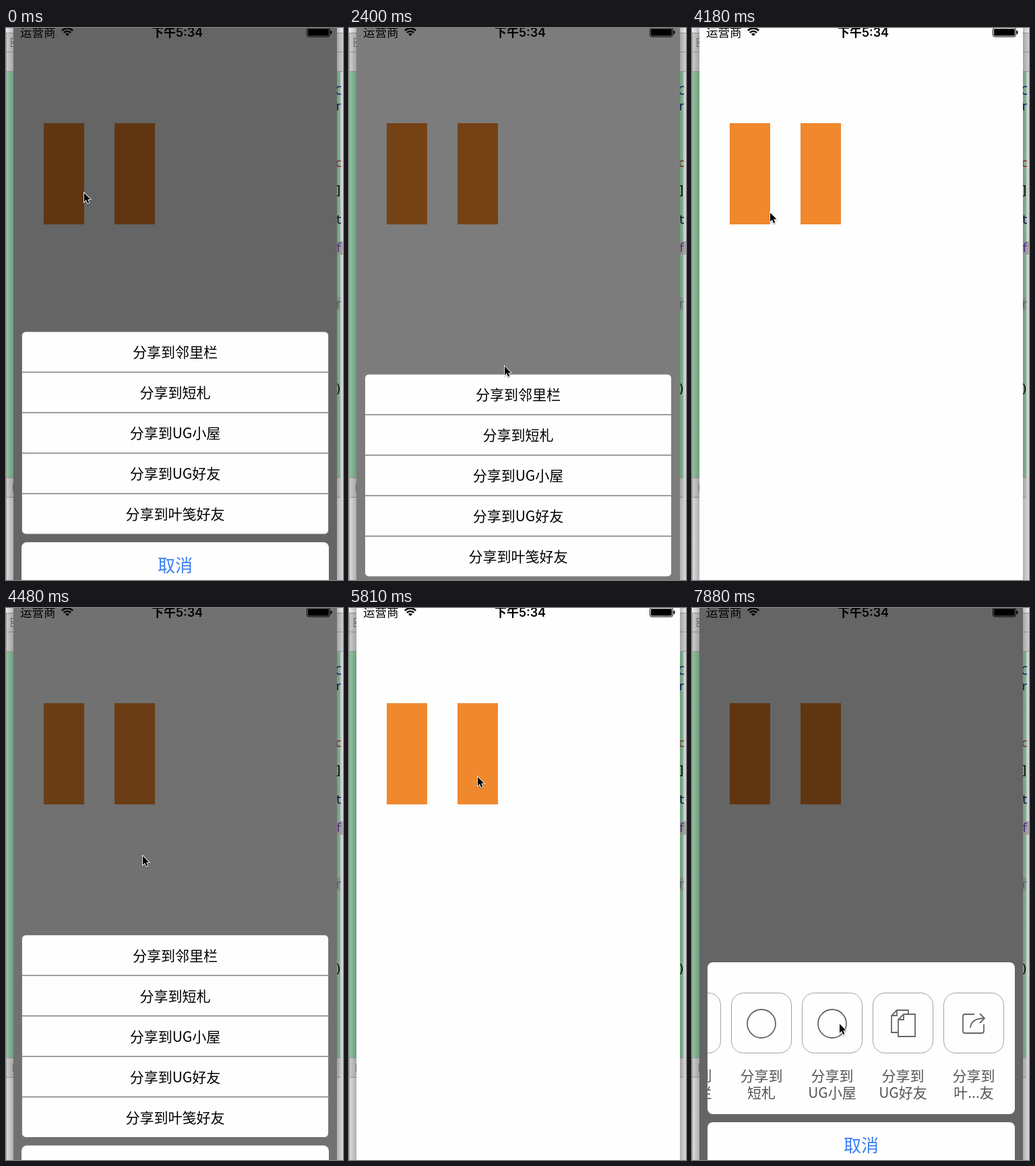
An HTML page with a canvas that plays this animation: 500 px wide and 818 px high, repeating every 8 s.

```html
<!DOCTYPE html>
<html lang="zh">
<head>
<meta charset="utf-8">
<title>分享面板</title>
<style>
html, body { margin: 0; width: 100%; height: 100%; overflow: hidden; background: #fefefe; }
canvas { display: block; width: 500px; height: 818px; }
</style>
</head>
<body>
<canvas id="stage" width="500" height="818"></canvas>
<script>
const ctx = document.getElementById('stage').getContext('2d');
const LOOP = 8000;
const CJK = '"Noto Sans CJK SC", "Noto Sans CJK", sans-serif';
const MONO = '"DejaVu Sans Mono", monospace';
const GREY = '#666';
const ORANGE = '#f0882e';

// Screen refreshes: first tick, last tick, number of ticks
const REFRESH = [
  [150, 600, 4], [1500, 1950, 4], [2250, 2990, 6], [3290, 4330, 8],
  [4480, 4780, 3], [5080, 5810, 6], [6250, 7280, 8], [7430, 7880, 4]
];
const POINTER = [
  [0, 115, 243], [600, 256, 541], [1350, 256, 541], [1500, 245, 485],
  [1950, 104, 238], [2250, 104, 238], [2400, 230, 500], [2990, 285, 663],
  [3290, 285, 663], [4190, 100, 238], [4330, 104, 242], [4480, 202, 366],
  [4780, 245, 600], [5080, 245, 590], [5810, 190, 249], [6250, 190, 249],
  [6850, 340, 615], [6990, 340, 615], [7280, 218, 615]
];
const SCROLL = [[6900, 0], [7280, 125], [7880, 85]];
const SHEETS = [
  { rise: -1000, fall: 1384.6, travel: 425, paint: drawList },
  { rise: 2208.8, fall: 3230, travel: 425, paint: drawList },
  { rise: 4273.8, fall: 5000, travel: 425, paint: drawList },
  { rise: 6190, fall: 9000, travel: 350, paint: drawGrid }
];
const TARGETS = ['邻里栏', '短札', 'UG小屋', 'UG好友', '叶笺好友'];

const clamp = u => Math.max(0, Math.min(1, u));
const ease = u => { u = clamp(u); return u * u * (3 - 2 * u); };
const halfPixel = v => Math.round(v * 2) / 2;

function refreshTime(t) {
  let last = 0;
  for (const [start, end, count] of REFRESH) {
    if (t < start) break;
    const gap = (end - start) / (count - 1);
    last = Math.min(end, start + Math.floor((t - start) / gap + 1e-6) * gap);
  }
  return last;
}

function follow(keys, t) {
  const next = keys.findIndex(k => k[0] > t);
  if (next < 0) return keys[keys.length - 1].slice(1);
  if (next === 0) return keys[0].slice(1);
  const a = keys[next - 1], b = keys[next];
  const u = ease((t - a[0]) / (b[0] - a[0]));
  return a.slice(1).map((v, i) => v + (b[i + 1] - v) * u);
}

function rect(color, x, y, w, h) {
  ctx.fillStyle = color;
  ctx.fillRect(x, y, w, h);
}

function rounded(x, y, w, h, r) {
  ctx.beginPath();
  ctx.roundRect(x, y, w, h, r);
}

function text(str, x, y, font, color = '#000', align = 'center') {
  ctx.font = font;
  ctx.fillStyle = color;
  ctx.textAlign = align;
  ctx.fillText(str, x, y);
}

function line(points, close) {
  ctx.beginPath();
  points.forEach(([x, y]) => ctx.lineTo(x, y));
  if (close) ctx.closePath();
}

function drawDesktop() {
  for (const [x, w] of [[0, 11], [491, 9]]) {
    rect('#fafafa', x, 0, w, 7);
    rect('#dcdcdc', x, 7, w, 58);
    rect('#a8a8a8', x, 7, w, 1);
    rect('#a8a8a8', x, 35, w, 1);
    rect('#a8a8a8', x, 64, w, 1);
    rect('#97d3aa', x, 65, w, 601);
    rect('#a8a8a8', x, 666, w, 1);
    rect('#dcdcdc', x, 667, w, 28);
    rect('#a8a8a8', x, 695, w, 1);
    rect('#ececec', x, 696, w, 122);
  }
  rect('#a5a5a5', 0, 7, 1, 811);
  rect('#e6e6e6', 496, 65, 4, 753);
  ctx.strokeStyle = '#777';
  ctx.lineWidth = 1;
  ctx.strokeRect(7.5, 15.5, 6, 5);
  ctx.strokeRect(7.5, 22.5, 6, 5);
  rect('#888', 10, 675, 1, 12);
  rect('#b5b5b5', 491, 316, 9, 20);
  rect('#9db3a6', 491, 399, 5, 20);
  const code = [
    ['C', 99, '#1a1a70'], ['r', 122, '#1a1a70'], ['c', 206, '#b02a30'], [']', 247, '#000'],
    ['t', 290, '#101040'], ['f', 332, '#5a3a9a'], ['r', 415, '#6a7f80'], [')', 541, '#000']
  ];
  ctx.save();
  ctx.beginPath();
  ctx.rect(491, 65, 6, 601);
  ctx.clip();
  for (const [ch, y, color] of code) text(ch, 488, y, '18px ' + MONO, color, 'left');
  ctx.restore();
  shade(11, 0, 11);
  shade(491, 500, 9);
}

function shade(from, to, width) {
  const g = ctx.createLinearGradient(from, 0, to, 0);
  g.addColorStop(0, 'rgba(0,0,0,.26)');
  g.addColorStop(1, 'rgba(0,0,0,.05)');
  rect(g, Math.min(from, to), 0, width, 818);
}

function drawStatusBar() {
  text('运营商', 21, 13, '17.5px ' + CJK, '#000', 'left');
  text('下午5:34', 254, 13, '600 18px Inter, ' + CJK);
  ctx.strokeStyle = ctx.fillStyle = '#000';
  ctx.lineWidth = 2.6;
  for (const r of [11.5, 7.3]) {
    ctx.beginPath();
    ctx.arc(91, 12, r, -Math.PI * .75, -Math.PI * .25);
    ctx.stroke();
  }
  ctx.beginPath();
  ctx.moveTo(91, 12);
  ctx.arc(91, 12, 4.2, -Math.PI * .75, -Math.PI * .25);
  ctx.fill();
  ctx.lineWidth = 1;
  rounded(446.5, -.5, 34, 13.5, 3);
  ctx.stroke();
  rounded(448, 1, 31, 10.5, 1.5);
  ctx.fill();
  rounded(481.5, 4, 2, 5, 1);
  ctx.fill();
}

function drawPanel(x, y, w, h, r) {
  rounded(x, y, w, h, r);
  ctx.fillStyle = '#fefefe';
  ctx.fill();
}

function drawList() {
  drawPanel(23.5, 450, 455, 300, 6);
  ctx.strokeStyle = '#7c7c7c';
  ctx.lineWidth = 1;
  ctx.stroke();
  ctx.lineWidth = 1.5;
  TARGETS.forEach((name, i) => {
    const y = 450 + i * 60;
    if (i) {
      line([[24, y], [478, y]]);
      ctx.stroke();
    }
    text('分享到' + name, 251, y + 38, '21px ' + CJK);
  });
}

function drawPages(x, y) {
  line([[x - 8, y + 14], [x - 17, y + 14], [x - 17, y - 11], [x - 9, y - 19], [x + 8, y - 19], [x + 8, y - 13]]);
  ctx.stroke();
  line([[x - 17, y - 11], [x - 9, y - 11], [x - 9, y - 19]]);
  ctx.stroke();
  line([[x - 7, y - 5], [x + 1, y - 13], [x + 18, y - 13], [x + 18, y + 20], [x - 7, y + 20]], true);
  ctx.stroke();
  line([[x - 7, y - 5], [x + 1, y - 5], [x + 1, y - 13]]);
  ctx.stroke();
}

function drawShare(x, y) {
  ctx.beginPath();
  ctx.moveTo(x + 1, y - 13);
  ctx.arcTo(x - 16, y - 13, x - 16, y + 15, 3);
  ctx.arcTo(x - 16, y + 15, x + 15, y + 15, 3);
  ctx.arcTo(x + 15, y + 15, x + 15, y, 3);
  ctx.lineTo(x + 15, y + 2);
  ctx.stroke();
  ctx.beginPath();
  ctx.moveTo(x - 5, y + 7);
  ctx.quadraticCurveTo(x - 4, y - 7, x + 16, y - 7);
  ctx.stroke();
  line([[x + 9, y - 14], [x + 16, y - 7], [x + 9, y]]);
  ctx.stroke();
}

function drawRing(x, y) {
  ctx.beginPath();
  ctx.arc(x, y + 1, 21, 0, Math.PI * 2);
  ctx.stroke();
}

function drawGrid(t) {
  const [scroll] = follow(SCROLL, t);
  const icons = [drawRing, drawRing, drawRing, drawPages, drawShare];
  drawPanel(23, 525, 456, 225, 8);
  ctx.save();
  ctx.clip();
  TARGETS.forEach((name, i) => {
    const x = 83 + i * 105 - scroll;
    rounded(x - 44.5, 570.5, 89, 89, 18);
    ctx.strokeStyle = '#a0a0a0';
    ctx.lineWidth = 1;
    ctx.stroke();
    ctx.strokeStyle = GREY;
    ctx.lineWidth = 1.8;
    icons[i](x, 615);
    const label = i === 4 ? '叶...友' : name;
    text('分享到', x, 701, '21px ' + CJK, '#555');
    text(label, x, 726, '21px ' + CJK, '#555');
  });
  ctx.restore();
}

function drawSheet(sheet, shown, t) {
  ctx.save();
  ctx.translate(0, halfPixel(sheet.travel * (1 - shown)));
  sheet.paint(t);
  drawPanel(23, 762, 456, 75, 8);
  text('取消', 251, 806, '26px ' + CJK, '#3a7ff6');
  ctx.restore();
}

function drawPointer(x, y) {
  ctx.save();
  ctx.translate(x + 1, y + 1.5);
  ctx.scale(.9, .9);
  line([[0, 0], [0, 14.5], [3.3, 11.4], [5.7, 17], [8.2, 16], [5.8, 10.6], [10.3, 10.3]], true);
  ctx.shadowColor = 'rgba(0,0,0,.35)';
  ctx.shadowBlur = 2;
  ctx.shadowOffsetY = 1;
  ctx.strokeStyle = '#fff';
  ctx.lineWidth = 2;
  ctx.stroke();
  ctx.shadowColor = 'transparent';
  ctx.fillStyle = '#000';
  ctx.fill();
  ctx.restore();
}

function draw(t) {
  drawDesktop();
  ctx.save();
  ctx.beginPath();
  ctx.rect(11, 0, 480, 818);
  ctx.clip();
  rect('#fefefe', 11, 0, 480, 818);
  rect(ORANGE, 56, 141, 60, 150);
  rect(ORANGE, 161, 141, 60, 150);
  for (const sheet of SHEETS) {
    const shown = ease((t - sheet.rise) / 250) - ease((t - sheet.fall) / 250);
    if (shown <= 0) continue;
    rect(`rgba(0,0,0,${.6 * shown})`, 11, 0, 480, 818);
    drawSheet(sheet, shown, t);
  }
  drawStatusBar();
  ctx.restore();
  drawPointer(...follow(POINTER, t));
}

const began = performance.now();
function tick() {
  draw(refreshTime((performance.now() - began) % LOOP));
  requestAnimationFrame(tick);
}
tick();
</script>
</body>
</html>
```
